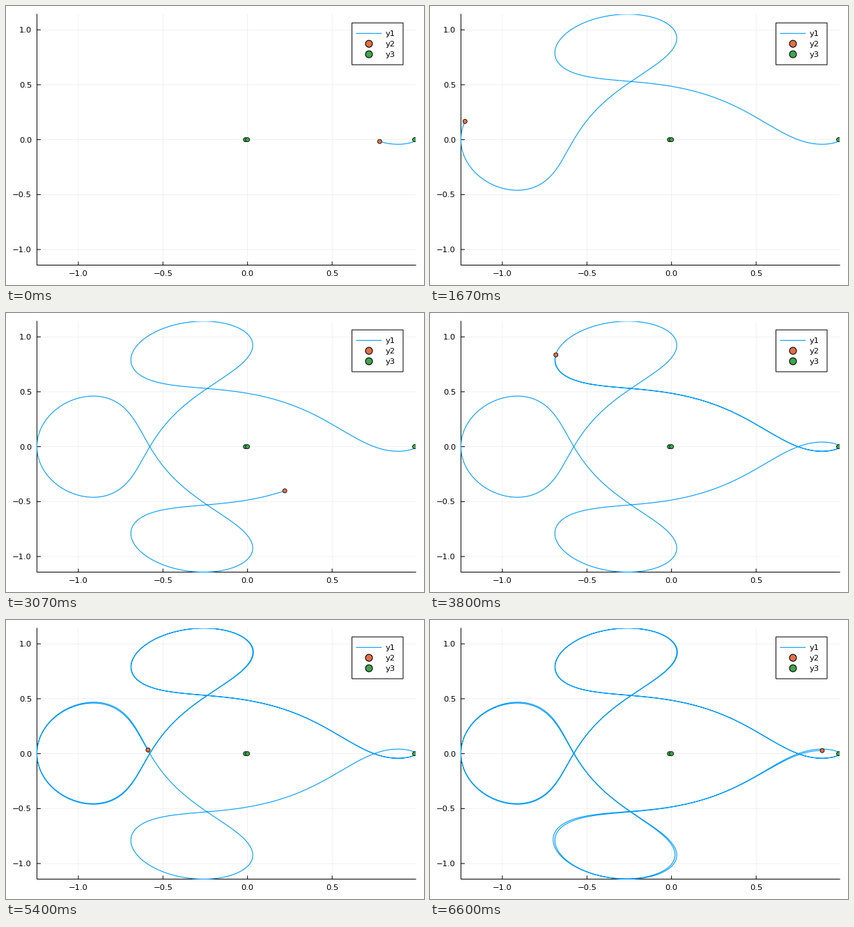
Animation of 600x400 px, one loop 6.67 s. Source, as a matplotlib script:

```python
import numpy as np
import matplotlib.pyplot as plt
from matplotlib.animation import FuncAnimation
from matplotlib.patches import Circle, Rectangle

W, H, PT = 600, 400, 0.72            # stage in pixels, points per pixel
LOOP, TICK = 6670, 10                # ms
POSES = 100                          # shown at 15 per second
LEFT, RIGHT, TOP, BOTTOM = 44.4, 588.1, 11.8, 371.5
BLUE, ORANGE, GREEN = "#009AFA", "#E36F47", "#3EA44E"

# Arenstorf orbit of the restricted three-body problem
MU = 0.012277471
PERIOD = 17.0652165601579625
START = np.array([0.994, 0.0, 0.0, -2.00158510637908252])
T_END, PER_POSE = 34.0, 50
DRIFT = 0.0009                       # lag gained per unit time on the second lap


def deriv(s):
    x, y, vx, vy = s
    d1 = ((x + MU) ** 2 + y * y) ** 1.5
    d2 = ((x - 1 + MU) ** 2 + y * y) ** 1.5
    ax = x + 2 * vy - (1 - MU) * (x + MU) / d1 - MU * (x - 1 + MU) / d2
    ay = y - 2 * vx - (1 - MU) * y / d1 - MU * y / d2
    return np.array([vx, vy, ax, ay])


def half_lap():
    t, s, rows = 0.0, START, [(0.0, START[0], START[1])]
    end = PERIOD / 2
    while end - t > 1e-12:
        moon = np.hypot(s[0] - 1 + MU, s[1])
        h = min(0.01, 0.03 * np.sqrt(moon ** 3 / MU), end - t)
        k1 = deriv(s)
        k2 = deriv(s + h / 2 * k1)
        k3 = deriv(s + h / 2 * k2)
        k4 = deriv(s + h * k3)
        s = s + h / 6 * (k1 + 2 * k2 + 2 * k3 + k4)
        t += h
        rows.append((t, s[0], s[1]))
    return np.array(rows).T


# The second half mirrors the first in time and in y
t1, x1, y1 = half_lap()
lap_t = np.concatenate([t1, PERIOD - t1[-2::-1]])
lap_x = np.concatenate([x1, x1[-2::-1]])
lap_y = np.concatenate([y1, -y1[-2::-1]])


def position(t):
    lap, s = np.divmod(t, PERIOD)
    lag = DRIFT * s * lap
    x = np.interp(s - lag, lap_t, lap_x)
    y = np.interp(s - lag, lap_t, lap_y)
    c, n = np.cos(lag), np.sin(lag)
    return x * c + y * n, y * c - x * n


x_min, x_max, y_max = lap_x.min(), lap_x.max(), lap_y.max()


def px(x):
    return LEFT + (x - x_min) / (x_max - x_min) * (RIGHT - LEFT)


def py(y):
    return (TOP + BOTTOM) / 2 - y / y_max * (BOTTOM - TOP) / 2


path_x, path_y = position(np.linspace(0, T_END, POSES * PER_POSE + 1))
path_x, path_y = px(path_x), py(path_y)

fig = plt.figure(figsize=(W / 100, H / 100), dpi=100, facecolor="white")
ax = fig.add_axes([0, 0, 1, 1])
ax.set_xlim(0, W)
ax.set_ylim(H, 0)
ax.axis("off")
area = Rectangle((LEFT, TOP), RIGHT - LEFT, BOTTOM - TOP, fc="none", ec="none")
ax.add_patch(area)


def line(xs, ys, color="black", width=1.0, **kw):
    return ax.plot(xs, ys, color=color, lw=width * PT, snap=False, **kw)[0]


def grid(xs, ys):
    line(xs, ys, width=0.55, alpha=0.1, zorder=1)


def text(x, y, s, ha="left"):
    ax.text(x, y, s, ha=ha, va="baseline", family="DejaVu Sans",
            size=11.5 * PT, zorder=6)


def dot(x, y, r, color, edge=0.8, z=4):
    c = Circle((x, y), r, fc=color, ec="black", lw=edge * PT, zorder=z)
    return ax.add_patch(c)


def tick_label(v):
    return f"{v:.1f}".replace("-", "\u2212")


for v in (-1.0, -0.5, 0.0, 0.5):
    x = px(v)
    grid([x, x], [TOP, BOTTOM])
    line([x, x], [BOTTOM, BOTTOM - 4.5], zorder=2)
    text(x, 387, tick_label(v), "center")
for v in (-1.0, -0.5, 0.0, 0.5, 1.0):
    y = py(v)
    grid([LEFT, RIGHT], [y, y])
    line([LEFT, LEFT + 5], [y, y], zorder=2)
    text(37, y + 4, tick_label(v), "right")
line([LEFT, LEFT, RIGHT], [TOP, BOTTOM, BOTTOM], zorder=2)

trail = line([], [], BLUE, 1.1, zorder=3)
trail.set_clip_path(area)
body = dot(0, 0, 3, ORANGE)
body.set_clip_path(area)
for v in (-MU, 0.0, 1 - MU):
    dot(px(v), py(0), 3, GREEN, z=4.5).set_clip_path(area)

ax.add_patch(Rectangle((496.6, 24.2), 73.4, 60, fc="white", ec="black",
                       lw=PT, snap=False, zorder=5))
line([503, 538.7], [39.3, 39.3], BLUE, 1.1, zorder=6)
dot(521, 54.2, 5, ORANGE, 1.1, 6)
dot(521, 69.2, 5, GREEN, 1.1, 6)
for i in range(3):
    text(545, 43.3 + 15 * i, f"y{i + 1}")


def draw(i):
    pose = int((i + 0.5) * TICK * 15 / 1000)
    n = (pose + 1) * PER_POSE
    trail.set_data(path_x[:n + 1], path_y[:n + 1])
    body.center = path_x[n], path_y[n]
    return trail, body


anim = FuncAnimation(fig, draw, frames=LOOP // TICK, interval=TICK,
                     init_func=lambda: draw(0), repeat=True, repeat_delay=0)
plt.show()
```
